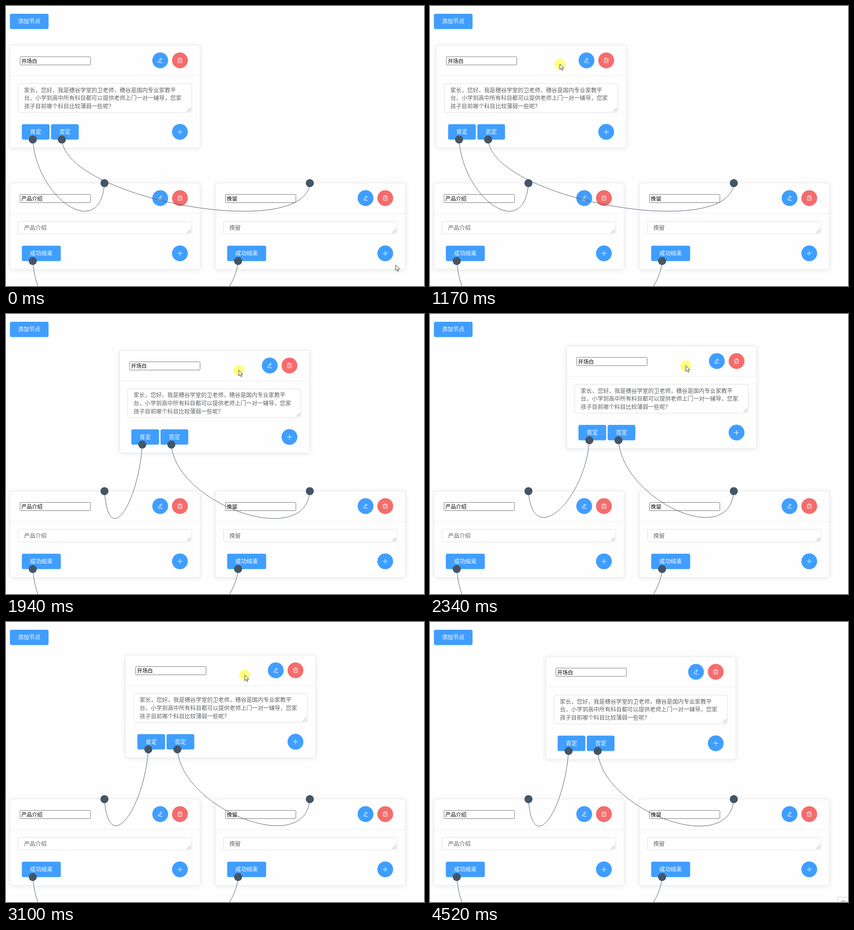
An HTML page that plays this animation: 914x613 px, repeating every 4590 ms.

```html
<!DOCTYPE html>
<html lang="zh-CN">
<head>
<meta charset="utf-8">
<title>流程节点拖拽</title>
<style>
html, body { margin: 0; width: 100%; height: 100%; overflow: hidden; background: #fefefe; }
svg { display: block; width: 914px; height: 613px; }
text { font: 12.3px "Noto Sans CJK SC", "Noto Sans CJK", sans-serif; fill: #606266; }
.card { fill: #fefefe; stroke: #ebeef5; filter: drop-shadow(0 1.7px 5px rgba(0,0,0,.1)); }
.rule { stroke: #ebeef5; }
.field { fill: #fff; stroke: #767676; }
.name { font-size: 11.5px; fill: #000; }
.area { fill: #fff; stroke: #dcdfe6; }
.area.hover { stroke: #c0c4cc; }
.grip { stroke: #777; stroke-width: .9; }
.blue { fill: #409eff; }
.red { fill: #f56c6c; }
.label { fill: #fff; text-anchor: middle; }
.icon { fill: none; stroke: #fff; stroke-width: 1; stroke-linejoin: round; }
.link { fill: none; stroke: #456; stroke-width: .95; }
.dot { fill: #456; }
.arrow { fill: #fff; stroke: #222; stroke-width: .9; }
</style>
</head>
<body>
<svg id="stage" viewBox="0 0 914 613"></svg>
<script>
const stage = document.getElementById('stage');
const LOOP = 4590;
const SCALE = 0.864;
const BEND = 150 * SCALE, SIDE = 10 * SCALE;

function add(parent, tag, attrs, content) {
  const el = document.createElementNS('http://www.w3.org/2000/svg', tag);
  for (const k in attrs) el.setAttribute(k, attrs[k]);
  if (content) el.textContent = content;
  parent.appendChild(el);
  return el;
}

const move = (el, x, y) => el.setAttribute('transform', `translate(${x} ${y})`);

// Text placed by the vertical middle of its line
function write(parent, x, mid, content, cls = '', size = 12.3) {
  return add(parent, 'text', { x, y: mid + size * 0.38, class: cls }, content);
}

function button(parent, x, y, w, label) {
  add(parent, 'rect', { x, y, width: w, height: 33.6, rx: 3.5, class: 'blue' });
  write(parent, x + w / 2, y + 16.8, label, 'label');
}

const ICONS = {
  pen: 'M-4.2 4.8L-4 1.6L1.2 -5.2L3.8 -3.2L-1.4 3.4ZM-.2 -3.4L2.4 -1.4M-1 5H5.2',
  bin: 'M-5.2 -3.2H5.2M-1.8 -3.4V-5.2H1.8V-3.4M-4 -3V5H4V-3M-1.4 -.6V2.6M1.4 -.6V2.6',
  plus: 'M-5.5 0H5.5M0 -5.5V5.5'
};

function round(parent, x, y, icon, cls) {
  const g = add(parent, 'g', {});
  move(g, x, y);
  add(g, 'circle', { r: 17.3, class: cls });
  add(g, 'path', { d: ICONS[icon], class: 'icon' });
}

function makeCard(x, y, title, lines, labels) {
  const g = add(stage, 'g', {});
  const areaH = lines.length > 1 ? 63 : 27.5;
  const h = areaH + 160.7;
  add(g, 'rect', { width: 415, height: h, rx: 3.5, class: 'card' });
  add(g, 'path', { d: 'M.5 66H414.5', class: 'rule' });
  add(g, 'rect', { x: 21.8, y: 24.5, width: 154, height: 18, rx: 1.5, class: 'field' });
  write(g, 24.8, 33.7, title, 'name', 11.5);
  round(g, 328.2, 32.6, 'pen', 'blue');
  round(g, 371.3, 32.6, 'bin', 'red');
  const area = add(g, 'rect', { x: 17.5, y: 83.5, width: 379.5, height: areaH, rx: 3.5, class: 'area' });
  lines.forEach((s, i) => write(g, 30.5, 97.6 + 17.7 * i, s));
  const b = 83.5 + areaH;
  add(g, 'path', { d: `M387 ${b - 2}L395 ${b - 10}M391.5 ${b - 2}L395 ${b - 5.5}`, class: 'grip' });
  let left = 25.6;
  for (const s of labels) {
    const w = s.length * 12.3 + 36;
    button(g, left, h - 51.4, w, s);
    left += w + 3.2;
  }
  round(g, 371.3, h - 34.7, 'plus', 'blue');
  const card = { g, area, areaH, h };
  place(card, x, y);
  return card;
}

function place(card, x, y) {
  card.x = x;
  card.y = y;
  move(card.g, x, y);
}

const outlet = (card, i) => [card.x + 49.5 + 63.6 * i, card.y + card.h - 18];
const inlet = card => [card.x + 206.3, card.y - 0.3];

function curve([sx, sy], [tx, ty]) {
  const side = tx > sx ? SIDE : -SIDE;
  return `M${sx} ${sy}C${sx + side} ${sy + BEND} ${tx - side} ${ty + BEND} ${tx} ${ty}`;
}

button(stage, 8.5, 17, 84.5, '添加节点');

const HOME = [9, 86.5];
const opening = makeCard(...HOME, '开场白', [
  '家长，您好，我是穗谷学堂的卫老师，穗谷是国内专业家教平',
  '台，小学到高中所有科目都可以提供老师上门一对一辅导，您家',
  '孩子目前哪个科目比较薄弱一些呢？'
], ['肯定', '否定']);
const intro = makeCard(9, 388, '产品介绍', ['产品介绍'], ['成功结束']);
const retain = makeCard(458, 388, '挽留', ['挽留'], ['成功结束']);
const cards = [opening, intro, retain];
const END = [215.3, 688];

const links = [
  [() => outlet(opening, 0), () => inlet(intro)],
  [() => outlet(opening, 1), () => inlet(retain)],
  [() => outlet(intro, 0), () => END],
  [() => outlet(retain, 0), () => END]
].map(([from, to]) => ({ from, to, path: add(stage, 'path', { class: 'link' }) }));

for (const link of links) {
  link.dots = [0, 1].map(() => add(stage, 'circle', { r: 8.8, class: 'dot' }));
}

const badge = add(stage, 'g', {});
add(badge, 'rect', { x: 891.5, y: 602.5, width: 60, height: 24, fill: '#fff', stroke: '#ccc' });
write(badge, 897, 615, '停止').style.fill = '#888';

const glow = add(stage, 'circle', { r: 12, fill: '#ffff80' });
stage.insertBefore(glow, links[0].path);
const arrow = add(stage, 'path', {
  class: 'arrow',
  d: 'M0 0V12.2L2.8 9.6L4.8 14L6.8 13.1L4.9 8.8H8.7Z'
});

// Screen refreshes: first time, last time, count
const times = [0];
for (const [a, b, n] of [
  [70, 550, 8], [630, 1090, 7], [1170, 1640, 7], [1790, 2260, 7], [2340, 2340, 1],
  [2490, 2950, 7], [3030, 3330, 5], [3580, 4040, 7], [4520, 4520, 1]
]) {
  for (let i = 0; i < n; i++) {
    times.push(Math.floor((a + (n > 1 ? (b - a) * i / (n - 1) : 0)) / 10) * 10);
  }
}

// Drag offset: time, dx, dy
const DRAG = [
  [1090, 0, 0], [1170, 5, 0], [1330, 64, -3.5], [1560, 194, 13.7], [1640, 235, 14],
  [1790, 237, 9], [1940, 239.5, -6.3], [2260, 274, -8.5], [2340, 290, -16],
  [2490, 298, -16.3], [2640, 292, -16.3], [2790, 277, -16.3], [2950, 258, -15.5],
  [3330, 244.5, -10]
];
const ARRIVE = [[0, 852, 567], [550, 298, 165], [1090, 270, 129.5], [1170, 284, 127]];
const LEAVE = [[3510, 514, 119.5], [4040, 918, 563]];

const linear = u => u;
const smooth = u => (1 - Math.cos(Math.PI * u)) / 2;

function along(keys, t, ease) {
  if (t <= keys[0][0]) return keys[0].slice(1);
  for (let i = 1; i < keys.length; i++) {
    const [t0, x0, y0] = keys[i - 1], [t1, x1, y1] = keys[i];
    if (t <= t1) {
      const u = ease((t - t0) / (t1 - t0));
      return [x0 + (x1 - x0) * u, y0 + (y1 - y0) * u];
    }
  }
  return keys[keys.length - 1].slice(1);
}

function pointer(t) {
  if (t <= 1170) return along(ARRIVE, t, smooth);
  if (t >= 3580) return along(LEAVE, t, smooth);
  return [opening.x + 260.5, opening.y + 43];
}

function draw(t) {
  const [dx, dy] = along(DRAG, t, linear);
  place(opening, HOME[0] + dx, HOME[1] + dy);

  for (const { from, to, path, dots } of links) {
    const ends = [from(), to()];
    path.setAttribute('d', curve(...ends));
    dots.forEach((dot, i) => move(dot, ...ends[i]));
  }

  const [px, py] = pointer(t);
  move(arrow, px, py);
  move(glow, px, py);
  glow.style.display = t >= 1090 && t < 3580 ? '' : 'none';
  arrow.style.display = t < 4040 ? '' : 'none';
  badge.style.display = t >= 4520 ? '' : 'none';

  for (const c of cards) {
    const ax = px - c.x - 17.5, ay = py - c.y - 83.5;
    c.area.classList.toggle('hover', ax > 0 && ax < 379.5 && ay > 0 && ay < c.areaH);
  }
}

const start = performance.now();
let shown = -1;
function tick() {
  const t = (performance.now() - start) % LOOP;
  const now = times.filter(s => s <= t).pop();
  if (now !== shown) draw(shown = now);
  requestAnimationFrame(tick);
}
tick();
</script>
</body>
</html>
```
